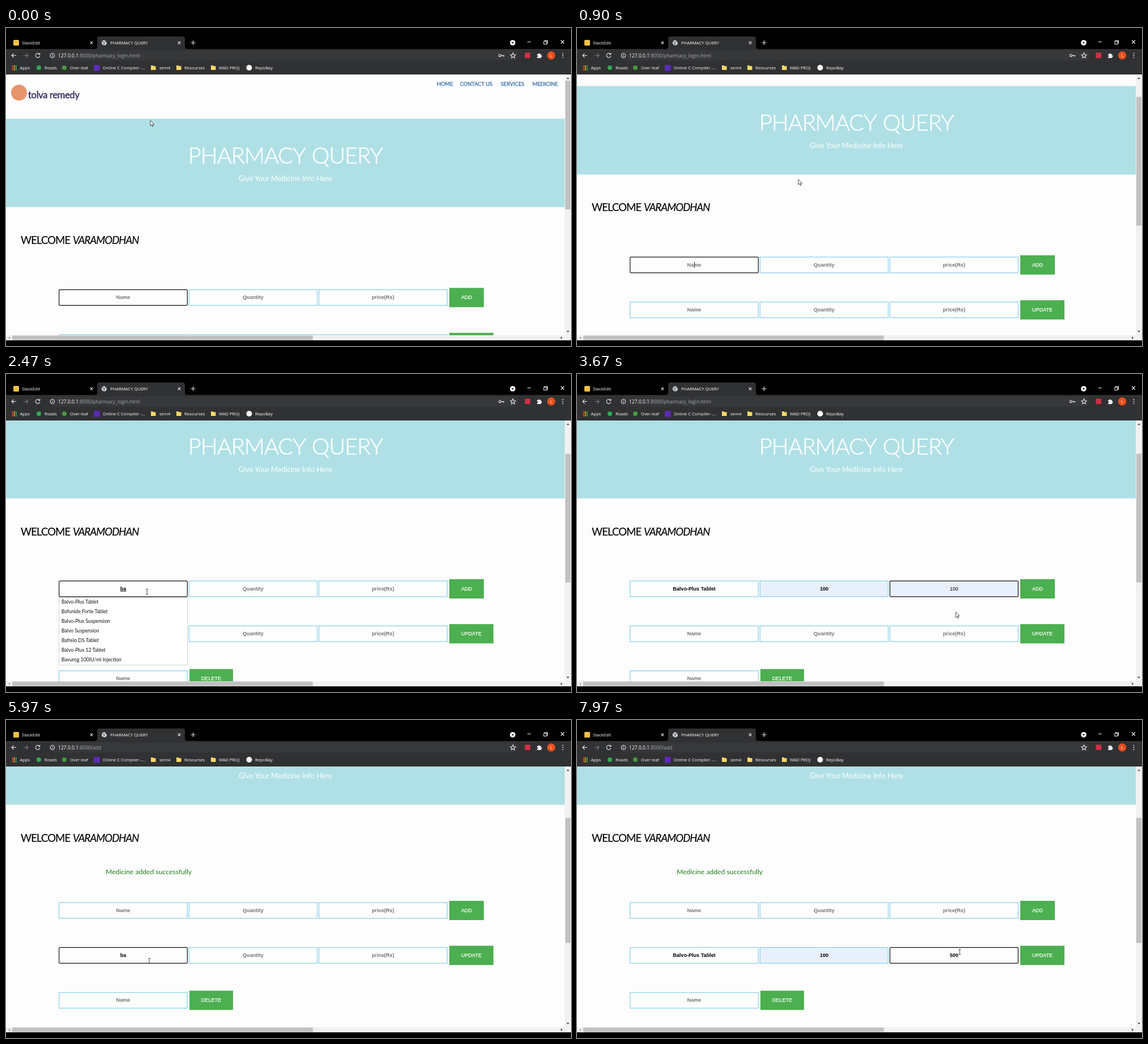
An HTML page that plays this animation: 998x561 px, repeating every 8 s.

```html
<!DOCTYPE html>
<html lang="en">
<head>
<meta charset="utf-8">
<title>Pharmacy query</title>
<style>
  html, body { margin: 0; width: 100%; height: 100%; overflow: hidden; background: #000; }
  svg { display: block; width: 100vw; height: 100vh; }
  text { white-space: pre; }
  .ui { font: 7.6px "Open Sans", "Noto Sans", sans-serif; fill: #fff; }
  .url { font-size: 8.55px; }
  .line { fill: none; stroke: #e8eaed; stroke-width: 1.1; }
  .page { font-family: Lato, "Open Sans", sans-serif; }
  .mid { text-anchor: middle; }
  .nav { font-size: 9.3px; fill: #2c66a6; stroke: #2c66a6; stroke-width: .25; }
  .title { font-size: 40px; font-weight: 300; letter-spacing: -1.2px; word-spacing: 3px; stroke: #fff; stroke-width: .5; }
  .welcome { font-size: 18.5px; letter-spacing: -.9px; stroke: #000; stroke-width: .15; }
  .form { font: bold 9.1px "Liberation Sans", Arial, sans-serif; text-anchor: middle; }
  .button { font-weight: normal; fill: #fff; stroke: #fff; stroke-width: .25; }
  .item { font-size: 8.7px; fill: #111; }
</style>
</head>
<body>
<svg viewBox="0 0 998 561">
  <defs>
    <clipPath id="view"><rect y="82" width="987" height="460"/></clipPath>
    <path id="folder" d="M0 1h3.5l1 1.2H8.500V9H0z" fill="#fbd768"/>
    <path id="cross" d="M-2.300-2.300 2.300 2.300M2.300-2.300-2.300 2.300" class="line"/>
  </defs>
  <rect width="998" height="561"/>

  <!-- tab strip -->
  <path d="M157 37q4 0 4-4V19q0-4 4-4h147q4 0 4 4v14q0 4 4 4z" fill="#303133"/>
  <rect x="13" y="21" width="10" height="10" rx="1.500" fill="#f0c04a"/>
  <circle cx="173.500" cy="26" r="4.600" fill="#d4d7db"/>
  <path d="M170 24l3 1 1 2-2 2M175 22l1 2 2 1" fill="none" stroke="#4a4b4e" stroke-width="1.200"/>
  <g class="ui">
    <text x="28" y="28.800">StackEdit</text>
    <text x="184" y="28.800">PHARMACY QUERY</text>
  </g>
  <use href="#cross" x="151" y="26"/>
  <use href="#cross" x="306" y="26"/>
  <path class="line" d="M326.500 26h8M330.500 22v8M921 24.500h6M950 23.500h5v5h-5zM951.500 23.500v-1.500h5v5h-1.500M980 21.500l6 6M986 21.500l-6 6"/>
  <circle cx="895" cy="26" r="4.800" fill="#fff"/>
  <path d="M892.800 25h4.400l-2.200 2.800z"/>

  <!-- toolbar -->
  <rect y="37" width="998" height="45" fill="#303133"/>
  <rect x="76" y="39.500" width="829" height="18" rx="9" fill="#37383a"/>
  <path class="line" d="M18 48.500h-8M13.500 45l-3.500 3.500 3.500 3.500"/>
  <path class="line" d="M31 48.500h8M35.500 45l3.500 3.500-3.500 3.500" opacity=".4"/>
  <path class="line" d="M59 46a3.800 3.800 0 1 0 .7 3.500M59.800 44v2.800H57"/>
  <circle class="line" cx="82" cy="48.500" r="3.700"/>
  <path class="line" d="M82 48v2.500M82 46v1"/>
  <text class="ui url" x="92" y="51.700">127.0.0.1<tspan id="path" fill="#a6a9ad"></tspan></text>
  <g id="key"><circle class="line" cx="872.500" cy="48.500" r="2"/><path class="line" d="M874.500 48.500h5v2M877.500 48.500v1.700"/></g>
  <path class="line" d="M895.500 44l1.300 3 3.200.3-2.400 2.200.7 3.200-2.800-1.700-2.800 1.700.7-3.200-2.400-2.200 3.200-.3z"/>
  <rect x="916.500" y="43.500" width="9.500" height="9.500" fill="#cf3045"/>
  <path d="M938 46h2.200a1.500 1.500 0 0 1 3 0h2v2.300a1.500 1.500 0 0 1 0 3V53H938v-2a1.500 1.500 0 0 0 0-3z" fill="#e8eaed"/>
  <circle cx="963" cy="48.500" r="7.200" fill="#e8501f"/>
  <text class="ui mid" x="963" y="51.200">L</text>
  <path d="M983.500 44v9" stroke="#e8eaed" stroke-width="1.700" stroke-dasharray="1.700 2"/>

  <!-- bookmarks -->
  <g id="apps"></g>
  <circle cx="58" cy="70" r="4" fill="#34a853"/>
  <circle cx="103" cy="70" r="4" fill="#479a3c"/>
  <rect x="155" y="65" width="10.500" height="10.500" fill="#5b2bb8"/>
  <use href="#folder" x="256" y="65"/>
  <use href="#folder" x="301" y="65"/>
  <use href="#folder" x="362" y="65"/>
  <circle cx="429.500" cy="70" r="5" fill="#fff"/>
  <g class="ui">
    <text x="24.500" y="72.700">Apps</text>
    <text x="68" y="72.700">Roads</text>
    <text x="113" y="72.700">Over leaf</text>
    <text x="171" y="72.700">Online C Compiler -...</text>
    <text x="271" y="72.700">sem4</text>
    <text x="315" y="72.700">Resourses</text>
    <text x="376" y="72.700">WAD PROJ</text>
    <text x="440" y="72.700">RepoBay</text>
  </g>

  <!-- page -->
  <rect y="82" width="998" height="469" fill="#fdfdfd"/>
  <g clip-path="url(#view)">
    <g id="doc" class="page">
      <circle cx="23" cy="114" r="14" fill="#e8946c"/>
      <text x="39" y="124" font-size="16.500" letter-spacing="-.3" fill="#34295c" stroke="#34295c" stroke-width=".4">tolva remedy</text>
      <g class="nav">
        <text x="761" y="102">HOME</text>
        <text x="802" y="102">CONTACT US</text>
        <text x="874" y="102">SERVICES</text>
        <text x="930" y="102">MEDICINE</text>
      </g>
      <rect y="160" width="987" height="156" fill="#afe0e5"/>
      <g class="mid" fill="#fff">
        <text class="title" x="493.500" y="238.500">PHARMACY QUERY</text>
        <text x="493.500" y="269.500" font-size="12.800">Give Your Medicine Info Here</text>
      </g>
      <text class="welcome" x="26" y="381">WELCOME</text>
      <text class="welcome" x="118" y="381" font-style="italic">VARAMODHAN</text>
      <text id="message" x="176" y="438.700" font-size="12.200" fill="#1d7d1d">Medicine added successfully</text>
      <g id="rows"></g>
      <rect id="caret" width=".9" height="10.500"/>
      <g id="list"></g>
    </g>
  </g>

  <!-- scrollbars -->
  <path d="M987 82h11v469H0v-9h987z" fill="#f1f1f1"/>
  <rect id="thumb" x="988" width="9" fill="#c1c1c1"/>
  <rect x="11" y="542.500" width="531" height="8" fill="#c1c1c1"/>
  <path d="M990 90l2.500-3 2.500 3zM990 534l2.500 3 2.500-3zM980 544l3 2.500-3 2.500z" fill="#505050"/>
  <path d="M7 544l-3 2.500 3 2.500z" fill="#a3a3a3"/>

  <g id="pointer">
    <path id="arrow" d="M0 0v9.500l2.200-2 1.500 3.300 1.500-.7-1.500-3.200h3z" fill="#fff" stroke="#222" stroke-width=".8"/>
    <path id="beam" d="M-2-4.500h1.500L0-4l.5-.5H2M0-4v8M-2 4.500h1.500L0 4l.5.5H2" fill="none" stroke="#333" stroke-width=".9"/>
  </g>
</svg>
<script>
const LOOP = 8000, SUBMIT = 4500;
const DRUG = 'Balvo-Plus Tablet';
const SUGGESTIONS = [DRUG, 'Bafunide Forte Tablet', 'Balvo-Plus Suspension', 'Balvo Suspension',
  'Bafrelo DS Tablet', 'Balvo-Plus 12 Tablet', 'Bavurog 100IU/ml Injection'];
const HINTS = ['Name', 'Quantity', 'price(Rs)'];
const ROWS = [
  { id: 'a', fields: 3, label: 'ADD', x: 783, width: 61 },
  { id: 'b', fields: 3, label: 'UPDATE', x: 783, width: 78 },
  { id: 'c', fields: 1, label: 'DELETE', x: 324, width: 77 }
];

// time, property or field, value, autofill state
const EVENTS = [
  [0, 'focus', 'a0'],
  [1900, 'a0', 'b'], [2100, 'a0', 'ba'], [2150, 'list', 'a0'],
  [2850, 'a0', DRUG], [2850, 'list', ''],
  [3050, 'focus', 'a1'], [3200, 'a1', '100', 'preview'], [3350, 'a1', '100', 'filled'],
  [3450, 'focus', 'a2'], [3600, 'a2', '100', 'preview'], [3850, 'a2', '100', 'filled'],
  [SUBMIT, 'focus', ''],
  [5600, 'focus', 'b0'], [5750, 'b0', 'b'], [5900, 'b0', 'ba'], [6030, 'list', 'b0'],
  [6500, 'b0', DRUG], [6500, 'list', ''],
  [6750, 'focus', 'b1'], [6950, 'b1', '100', 'preview'], [7050, 'b1', '100', 'filled'],
  [7250, 'focus', 'b2'], [7450, 'b2', '5'], [7600, 'b2', '50'], [7750, 'b2', '500']
];
const SCROLL = [[0, 0], [400, 0], [900, 57.5], [1150, 96.5], [SUBMIT - 1, 96.5], [SUBMIT, 0],
  [5100, 0], [5550, 166.5]];
const POINTER = [[0, 255, 163], [250, 255, 163], [900, 391, 267], [1250, 250, 380, 'beam'],
  [2470, 249, 384, 'beam'], [2750, 150, 402], [2900, 150, 402], [3050, 430, 382, 'beam'],
  [3350, 430, 422], [3450, 668, 382, 'beam'], [3600, 669, 420], [3850, 669, 420],
  [4200, 813, 382], [4450, 813, 382], [5000, 184, 441, 'beam'], [5250, 184, 441, 'beam'],
  [5550, 253, 425, 'beam'], [6050, 253, 425, 'beam'], [6400, 150, 438], [6550, 150, 438],
  [6750, 430, 415, 'beam'], [7000, 430, 455], [7250, 676, 409, 'beam']];

const $ = id => document.getElementById(id);
const set = (el, attrs) => Object.entries(attrs).forEach(([k, v]) => el.setAttribute(k, v));
const show = (el, on) => set(el, { visibility: on ? 'visible' : 'hidden' });
const fieldX = i => 93 + 229.5 * i;
const rowY = i => 461 + 79.25 * i;

function tween(keys, t) {
  const i = keys.findLastIndex(k => k[0] <= t), a = keys[i], b = keys[i + 1] || a;
  const p = b === a ? 0 : (t - a[0]) / (b[0] - a[0]), e = p * p * (3 - 2 * p);
  return { from: a, at: n => a[n] + (b[n] - a[n]) * e };
}

function build() {
  const colors = ['#ea4335', '#fbbc04', '#34a853', '#4285f4'];
  $('apps').innerHTML = Array.from({ length: 9 }, (_, i) =>
    `<rect x="${10.5 + i % 3 * 3.2}" y="${66 + Math.floor(i / 3) * 3.2}" width="2.2" height="2.2"
      fill="${colors[(i + Math.floor(i / 3)) % 4]}"/>`).join('');

  $('rows').innerHTML = ROWS.map((row, r) => {
    const y = rowY(r);
    const fields = HINTS.slice(0, row.fields).map((_, i) => `
      <rect id="${row.id}${i}" x="${fieldX(i) + .75}" y="${y + .6}" width="226.500" height="27.800"
        stroke-width="1.200"/>
      <text id="${row.id}${i}text" class="form" x="${fieldX(i) + 114}" y="${y + 17.3}"></text>`).join('');
    return `${fields}<rect x="${row.x}" y="${y - 2.5}" width="${row.width}" height="34" fill="#4caf50"/>
      <text class="form button" x="${row.x + row.width / 2}" y="${y + 17.3}">${row.label}</text>`;
  }).join('');

  $('list').innerHTML = '<rect x="93.500" y=".5" width="227" height="119" fill="#fff" stroke="#d4d4d4"/>' +
    SUGGESTIONS.map((s, i) => `<text class="item" x="98" y="${11.4 + i * 16.9}">${s}</text>`).join('');
}

function stateAt(t) {
  const state = { focus: '', list: '', fields: {} };
  for (const [time, key, value, fill] of EVENTS) {
    if (time > t) break;
    if (time === SUBMIT) state.fields = {};
    if (key in state) state[key] = value;
    else state.fields[key] = { value, fill };
  }
  return state;
}

function drawField(id, hint, state) {
  const { value, fill } = state.fields[id] || {};
  const focused = state.focus === id, text = $(id + 'text');
  set($(id), {
    fill: fill ? '#e8f0fe' : '#fdfdfd',
    stroke: focused ? '#101010' : '#87ceeb',
    rx: focused ? 1.5 : 0
  });
  if (text.textContent !== (value || hint)) text.textContent = value || hint;
  text.style.fill = value ? '#000' : '#757575';
  text.style.fontWeight = fill === 'preview' ? 'normal' : 'bold';
  text.style.textDecoration = state.list === 'a0' && id === 'a0' ? 'underline' : 'none';
}

function drawCaret(t, state, shift, rowIndex) {
  const typed = state.fields[state.focus];
  const blink = (t % 1000 >= 500) !== (t >= SUBMIT);
  const visible = state.focus && blink && typed?.fill !== 'preview';
  show($('caret'), visible);
  if (!visible) return;
  const half = typed ? $(state.focus + 'text').getComputedTextLength() / 2 : 0;
  set($('caret'), {
    x: fieldX(+state.focus[1]) + 114 + half,
    y: rowY(rowIndex) + shift + 9
  });
}

function draw(t) {
  const added = t >= SUBMIT, shift = added ? 27 : 0;
  const state = stateAt(t), scroll = tween(SCROLL, t).at(1);
  const rowOf = id => ROWS.findIndex(row => row.id === id[0]);

  set($('doc'), { transform: `translate(0 ${-scroll})` });
  set($('rows'), { transform: `translate(0 ${shift})` });
  set($('thumb'), { y: 93 + scroll * (added ? .479 : .495), height: added ? 220.5 : 227 });
  $('path').textContent = added ? ':8000/add' : ':8000/pharmacy_login.html';
  show($('key'), !added);
  show($('message'), added);

  ROWS.forEach(row => HINTS.slice(0, row.fields).forEach((hint, i) => drawField(row.id + i, hint, state)));
  drawCaret(t, state, shift, rowOf(state.focus));

  show($('list'), state.list);
  if (state.list) set($('list'), { transform: `translate(0 ${rowY(rowOf(state.list)) + shift + 29.5})` });

  const pointer = tween(POINTER, t), beam = pointer.from[3] === 'beam';
  set($('pointer'), { transform: `translate(${pointer.at(1)} ${pointer.at(2)})` });
  show($('beam'), beam);
  show($('arrow'), !beam);
}

build();
const start = performance.now();
function tick() {
  draw((performance.now() - start) % LOOP);
  requestAnimationFrame(tick);
}
tick();
</script>
</body>
</html>
```
